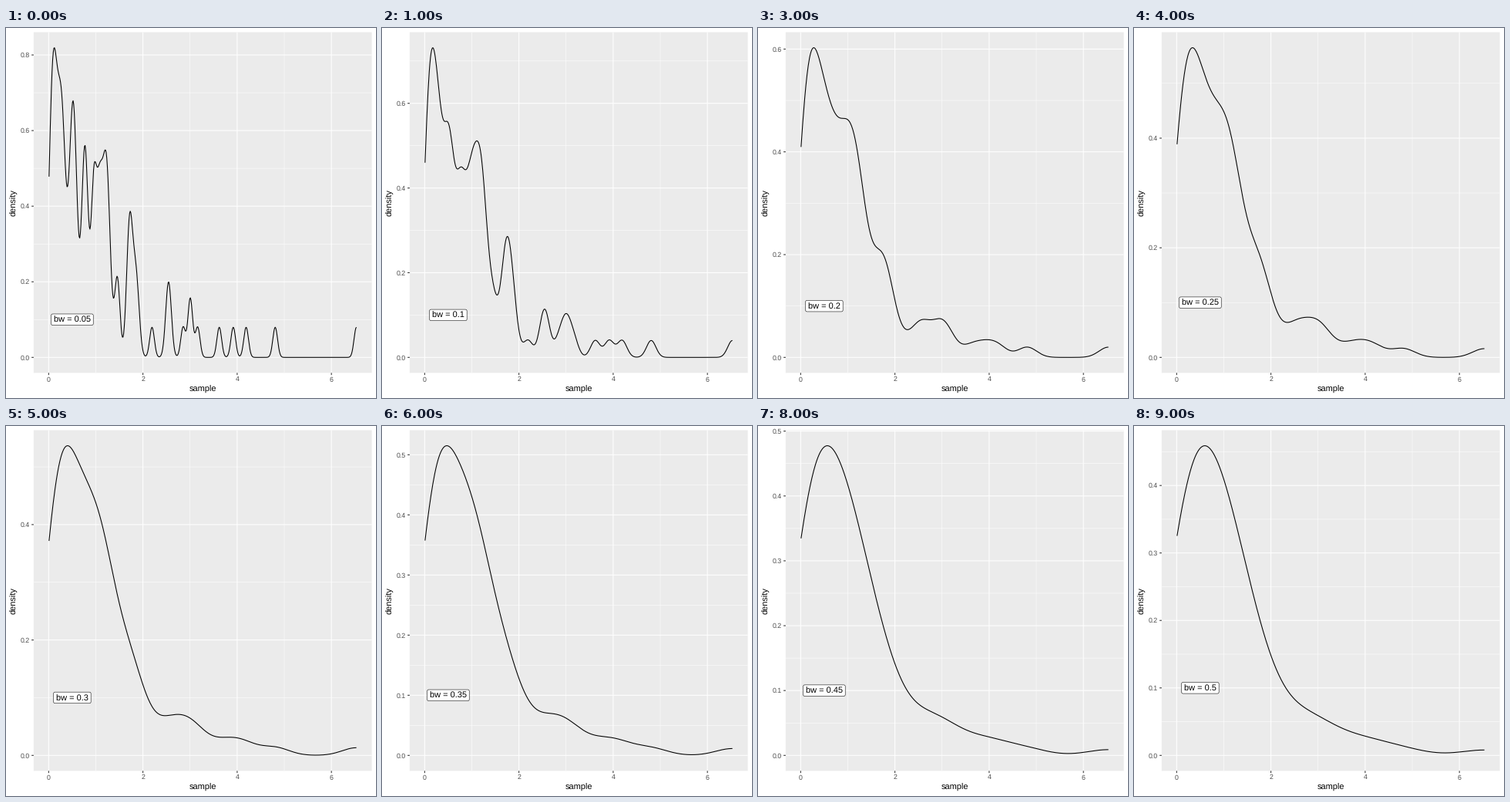
These frames come from a looping animation (480x480 px, 10000 ms). A matplotlib script:

```python
import numpy as np
import matplotlib.pyplot as plt
from matplotlib.animation import FuncAnimation
from matplotlib.patches import FancyBboxPatch, Rectangle

plt.rcParams["font.family"] = "Liberation Sans"
plt.rcParams["text.hinting"] = "none"

SIZE, DPI, N = 480, 100, 100
PX = 72 / DPI
LEFT, RIGHT, TOP, BOTTOM = 35.9, 474.5, 5.5, 447.4
X_MIN, X_MAX = 0.008, 6.53
MARGIN = 0.05
GREY, DARK = "#4d4d4d", "#333333"

# The sample as normal clusters: centre, number of points, spread
CLUSTERS = [
    (0.094, 16.9, 0.075), (0.28, 12.7, 0.069), (0.52, 13.7, 0.065),
    (0.77, 9.7, 0.049), (0.955, 5.85, 0.029), (1.075, 6.4, 0.045),
    (1.225, 10.1, 0.062), (1.457, 2.9, 0.025), (1.72, 5.9, 0.042),
    (1.857, 3.3, 0.042), (2.544, 3, 0.033), (3.005, 2, 0.01),
]
SINGLES = [2.193, 2.853, 3.162, 3.62, 3.917, 4.19, 4.807, X_MAX]

centers, counts, spreads = np.array(
    CLUSTERS + [(c, 1, 0) for c in SINGLES]).T
xs = np.linspace(X_MIN, X_MAX, 512)


def density(bw):
    """Gaussian kernel estimate; the bandwidth widens every cluster."""
    sigma = np.hypot(spreads, bw)
    z = (xs[:, None] - centers) / sigma
    return np.exp(-z * z / 2) @ (counts / (N * sigma * np.sqrt(2 * np.pi)))


def to_px(v, lo, hi, start, end):
    """Map a data range to pixels with a margin on both sides."""
    pad = MARGIN * (hi - lo)
    return start + (v - lo + pad) / (hi - lo + 2 * pad) * (end - start)


def px_x(v):
    return to_px(v, X_MIN, X_MAX, LEFT, RIGHT)


fig = plt.figure(figsize=(SIZE / DPI, SIZE / DPI), dpi=DPI, facecolor="white")
ax = fig.add_axes([0, 0, 1, 1])


def line(x, y, color, width, z):
    ax.plot(x, y, color=color, lw=width * PX, zorder=z, snap=False,
            solid_capstyle="butt", solid_joinstyle="round")


def text(x, y, s, size=11, color="black", ha="center", **kw):
    ax.text(x, y, s, fontsize=size * PX, color=color, ha=ha,
            va="baseline", zorder=6, **kw)


def draw_x_axis():
    for v in range(7):
        x = px_x(v)
        if v % 2:
            line([x, x], [TOP, BOTTOM], "white", 0.53, 1)
        else:
            line([x, x], [TOP, BOTTOM], "white", 1.07, 2)
            line([x, x], [BOTTOM, BOTTOM + 2.74], DARK, 1.07, 3)
            text(x, 458.5, str(v), 8.8, GREY)
    text((LEFT + RIGHT) / 2, 472, "sample")


def draw_y_axis(peak, px_y):
    limit = (1 + MARGIN) * peak + 0.001
    step = 0.2 if peak > 0.526 else 0.1
    for k in range(int(2 * limit / step) + 1):
        v = k * step / 2
        y = px_y(v)
        if k % 2:
            line([LEFT, RIGHT], [y, y], "white", 0.53, 1)
        else:
            line([LEFT, RIGHT], [y, y], "white", 1.07, 2)
            line([LEFT - 2.74, LEFT], [y, y], DARK, 1.07, 3)
            text(31, y + 3.15, f"{v:.1f}", 8.8, GREY, "right")
    text(13.7, (TOP + BOTTOM) / 2, "density", rotation=90,
         rotation_mode="anchor")


def draw_label(s, x, y):
    w, h = 48.5 + 6.1 * (len(s) - 8), 14.6
    ax.add_patch(FancyBboxPatch((x - w / 2, y - h / 2), w, h,
                                boxstyle="round,pad=0,rounding_size=2",
                                fc="white", ec="black", lw=0.53 * PX,
                                zorder=5, snap=False))
    text(x, y + 4, s)


def draw(i):
    bw = 0.05 * (i + 1)
    ys = density(bw)
    peak = ys.max()

    def px_y(v):
        return to_px(v, 0, peak, BOTTOM, TOP)

    ax.clear()
    ax.set_xlim(0, SIZE)
    ax.set_ylim(SIZE, 0)
    ax.axis("off")
    ax.add_patch(Rectangle((LEFT, TOP), RIGHT - LEFT, BOTTOM - TOP,
                           fc="#ebebeb", ec="none", zorder=0, snap=False))
    draw_x_axis()
    draw_y_axis(peak, px_y)
    line(px_x(xs), px_y(ys), "black", 1.07, 4)
    draw_label(f"bw = {round(bw, 2):g}", px_x(0.5), px_y(0.1))
    return []


anim = FuncAnimation(fig, draw, frames=10, interval=1000,
                     init_func=lambda: draw(0), repeat=True, repeat_delay=0)
plt.show()
```
